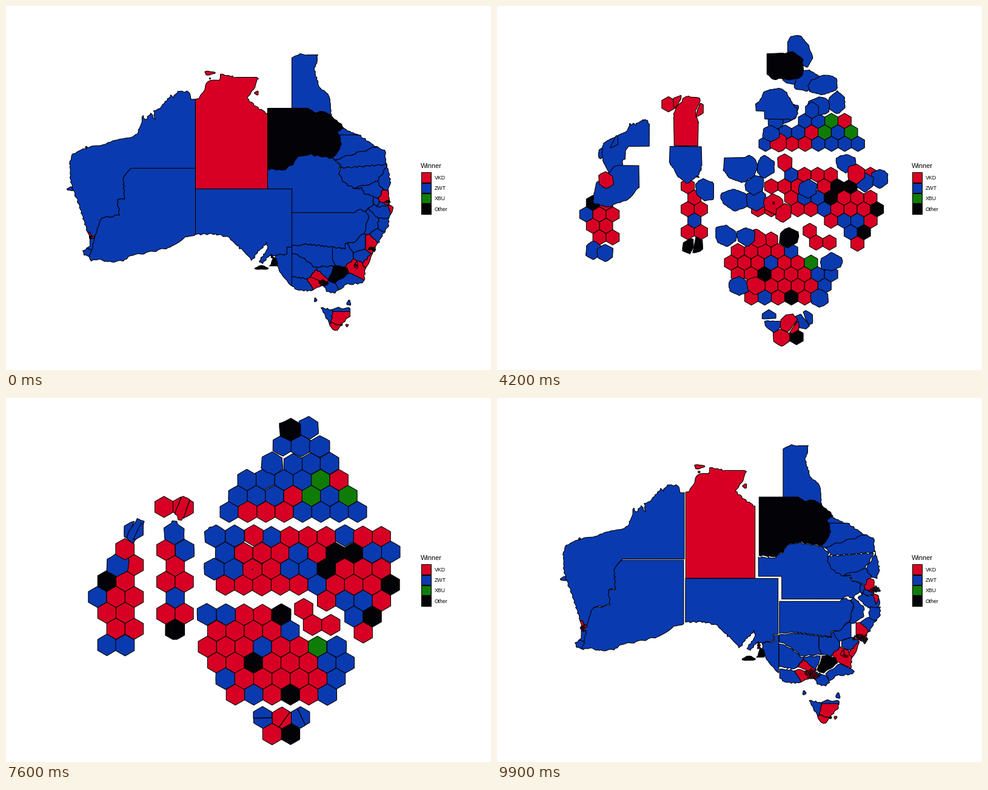
Recreate the animation shown at these times as a matplotlib script. Size 800x600 px, loop 10 s.

```python
import numpy as np
import matplotlib.pyplot as plt
from matplotlib.animation import FuncAnimation
from matplotlib.collections import PolyCollection
from matplotlib.patches import Rectangle

STEPS = 25
R = 18.15
DX, DY = 31.45, 27.3
COLOURS = {"R": "#d70024", "B": "#0a3ab0", "G": "#107c08", "K": "#020207"}
LABELS = {"R": "VKD", "B": "ZWT", "G": "XBU", "K": "Other"}

# hex rows per region: first y, rows of (first x, winners), city, city spread
REGIONS = {
    "WA": (216, [(214, "B"), (198, "R"), (182.5, "BR"), (167, "KR"), (151, "BRR"),
                 (167, "RR"), (182.5, "RR"), (167, "BB")], (139, 381), .04),
    "NT": (181.5, [(257, "RR")], (336, 119), .06),
    "SA": (216, [(272, "B"), (256, "RB"), (272, "R"), (256, "RR"), (272, "B"),
                 (256, "RR"), (272, "K")], (438, 412), .04),
    "QLD": (45, [(467, "KB"), (451, "BBB"), (435, "BBBB"), (388, "BBBBGR"),
                 (372, "BBBRGBG"), (357, "BRRRBBBB")], (629, 322), .04),
    "NSW": (221.5, [(336, "BBRBRRRBRR"), (351.5, "BRRRBRKKBB"), (336, "BBRRBBKRRR"),
                    (351.5, "RRRRRBRRRK"), (525, "RBBR"), (572, "BK"), (588, "R")],
            (604, 400), .04),
    "ACT": (344, [(487, "R"), (502, "RR")], (577, 427), .06),
    "VIC": (353, [(324, "BBRRK"), (340, "RRRRB"), (324, "RRRBRRGB"),
                  (340, "RRKRRRBB"), (356, "BRRRRRB"), (372, "RBRKRB")],
            (523, 456), .06),
    "TAS": (527.3, [(419, "BRB"), (434, "RK")], (553, 525), .08),
}


def ellipse(x, y, rx, ry, n=18, wobble=0):
    a = np.linspace(0, 2 * np.pi, n, endpoint=False) - np.pi / 2
    k = 1 + wobble * np.sin(3 * a + x)
    return np.column_stack([x + k * rx * np.cos(a), y + k * ry * np.sin(a)])


def islet(x, y, rx, ry):
    return ellipse(x, y, rx, ry, wobble=.25)


HEX = ellipse(0, 0, R, R, 6)
DOT = ellipse(0, 0, .6, .6, 6)


def clip(poly, normal, limit):
    """Keep the side of a polygon where p . normal <= limit."""
    out = []
    for p, q in zip(poly, np.roll(poly, -1, axis=0)):
        a, b = p @ normal - limit, q @ normal - limit
        if a <= 0:
            out.append(p)
        if a * b < 0:
            out.append(p + (q - p) * a / (a - b))
    return np.array(out)


def cells(outline, sites):
    """Divide an outline among sites, each point going to the nearest."""
    pts = np.array(sites, float)
    for a in pts:
        cell = np.array(outline, float)
        for b in pts:
            if (a != b).any():
                cell = clip(cell, b - a, (b @ b - a @ a) / 2)
        yield cell


def strips(angle, *breaks):
    """Cut the hexagon with parallel lines, in order along the angle."""
    n = np.array([np.cos(np.radians(angle)), np.sin(np.radians(angle))])
    edges = [-99, *breaks, 99]
    return [clip(clip(HEX, n, hi), -n, -lo) for lo, hi in zip(edges, edges[1:])]


def rough(points, step=3.2, amp=1.3):
    """Straight borders stay as they are, slanted ones get a ragged line."""
    out = []
    pts = np.array(points, float)
    for p, q in zip(pts, np.roll(pts, -1, axis=0)):
        out.append(p)
        if np.isclose(p, q).any():
            continue
        n = int(np.hypot(*(q - p)) // step)
        for j in range(1, n):
            x, y = p + (q - p) * j / n
            out.append((x + amp * np.sin(1.9 * x + 2.7 * y),
                        y + amp * np.sin(3.1 * x - 2.3 * y)))
    out = np.array(out)
    while len(out) < 18:
        mid = (out + np.roll(out, -1, axis=0)) / 2
        out = np.stack([out, mid], axis=1).reshape(-1, 2)
    return out


def clockwise(poly):
    x, y = poly.T
    area = np.sum(x * np.roll(y, -1) - y * np.roll(x, -1))
    return poly if area > 0 else poly[::-1]


def match(shape, goal):
    """Spread the points of shape over goal, turned to the nearest fit."""
    n = len(shape)
    ring = np.vstack([goal, goal[:1]])
    dist = np.r_[0, np.cumsum(np.hypot(*np.diff(ring, axis=0).T))]
    at = np.round(dist / dist[-1] * n)
    i = np.arange(n)
    even = np.column_stack([np.interp(i, at, ring[:, 0]), np.interp(i, at, ring[:, 1])])
    mid = shape - shape.mean(axis=0)
    fits = [np.sum(mid * np.roll(even, s, axis=0)) for s in range(n)]
    return np.roll(even, int(np.argmax(fits)), axis=0)


# borders shared by two outlines
west = [(206, 267), (193, 283), (195, 318), (183, 319), (187, 344), (158, 349), (146, 380)]
cape = [(471, 168), (498, 168), (508, 175), (525, 174), (536, 181)]
gulf = [(431, 268), (456, 270), (472, 262), (480, 249), (500, 244), (519, 248), (538, 250)]
coral = [(538, 250), (549, 236), (553, 227), (546, 206)]
downs = [(538, 250), (552, 262), (548, 276), (555, 289), (572, 300), (587, 299), (590, 309),
         (604, 312), (606, 326)]
tweed = [(606, 326), (613, 331), (632, 328)]
slopes = [(592, 338), (598, 348), (590, 375), (571, 390), (559, 391), (559, 400), (538, 397)]
plains = [(471, 395), (495, 392), (538, 397)]
bush = [(538, 397), (538, 418), (545, 428)]
murray = [(471, 407), (491, 415), (507, 430), (545, 428)]
alps = [(545, 428), (562, 431), (565, 440), (590, 452)]
southwest = [(146, 380), (142, 392), (141, 402), (137, 413)]

durack = west + [(134, 372), (119, 325), (106, 290), (105, 255), (110, 243), (133, 234),
                 (172, 224), (209, 215), (218, 207), (226, 180), (230, 187), (238, 176),
                 (246, 186), (243, 172), (254, 168), (271, 146), (276, 151), (283, 140),
                 (300, 141), (304, 152), (312, 153), (312, 267)]
o_coast = [(312, 267), (312, 376), (295, 380), (270, 397), (242, 404), (206, 411), (193, 420),
           (168, 421), (152, 417), (140, 420)]
top_end = [(312, 153), (318, 152), (333, 124), (351, 122), (353, 112), (380, 117), (407, 117),
           (416, 119), (408, 137), (397, 152), (412, 165), (431, 177), (431, 301), (312, 301)]
outback = [(312, 301), (471, 301), (471, 397), (463, 397), (463, 408), (443, 411), (434, 411),
           (423, 424), (417, 421), (427, 407), (431, 399), (429, 389), (418, 402), (404, 419),
           (393, 405), (378, 392), (368, 381), (345, 375), (312, 376)]
barker = [(471, 397), (471, 461), (458, 447), (447, 428), (443, 411), (463, 408), (463, 397)]
mayo = [(440, 413), (445, 416), (447, 428), (434, 428)]
york = cape + [(534, 155), (530, 144), (516, 133), (508, 105), (514, 80), (497, 80),
               (485, 78), (471, 85)]
kennedy = [(431, 168)] + cape + [(545, 188), (557, 201)] + coral[::-1] + gulf[-2::-1]
maranoa = gulf + downs[1:] + [(592, 338), (582, 335), (575, 340), (471, 340), (471, 301), (431, 301)]
parkes = [(471, 340), (575, 340), (582, 335)] + slopes + plains[-2::-1]
farrer = plains + bush[1:] + murray[-2::-1]
kangaroo = islet(421, 431, 10, 3)

# groups of neighbours: region, outline, {(row, column): site}
ZONES = [
    ("WA", southwest + [(128, 410), (126, 403), (138, 395), (138, 384), (134, 372)],
     {(1, 0): (140, 374), (7, 0): (140, 391), (7, 1): (134, 409)}),
    ("QLD", coral + [(557, 201), (581, 212), (605, 228), (624, 237), (626, 252), (634, 290),
                     (630, 300), (632, 328)] + tweed[-2::-1] + downs[-2:0:-1],
     {(1, 0): (590, 200), (1, 1): (590, 224), (1, 2): (598, 250), (3, 1): (600, 276),
      (2, 3): (630, 293), (2, 2): (609, 306), (2, 1): (638, 316), (5, 1): (625, 315),
      (3, 0): (604, 324), (4, 0): (618, 333)}),
    ("NSW", tweed + [(638, 331), (630, 352), (631, 362), (612, 391), (592, 433), (590, 452)]
     + alps[-2::-1] + bush[-2::-1] + slopes[-2::-1],
     {(2, 1): (556, 411), (1, 0): (584, 394), (1, 4): (589, 411), (2, 2): (577, 432),
      (3, 2): (600, 420), (0, 1): (602, 358), (0, 7): (622, 338), (0, 2): (640, 333),
      (1, 9): (624, 360), (1, 8): (617, 379), (0, 8): (601, 394)}),
    ("VIC", murray + alps[1:] + [(587, 456), (558, 459), (542, 473), (528, 470), (522, 459),
                                 (503, 469), (483, 468), (471, 461)],
     {(0, 0): (499, 432), (4, 0): (495, 466), (4, 1): (511, 458), (0, 2): (516, 446),
      (0, 1): (525, 436), (0, 4): (546, 443), (2, 7): (556, 457), (5, 5): (535, 468)}),
    ("TAS", [(519, 497), (537, 500), (545, 497), (567, 498), (567, 511), (553, 525),
             (546, 534), (538, 532), (527, 514)],
     {(0, 0): (523, 508), (0, 2): (552, 494), (0, 1): (552, 512), (1, 0): (545, 538)}),
]

# large seats in drawing order: (region, row, column) -> parts
large = {
    ("WA", 0, 0): [islet(106, 301, 5, 3), durack, islet(132, 232, 1.5, 1)],
    ("WA", 2, 0): [west[::-1] + o_coast + southwest[:0:-1]],
    ("NT", 0, 1): [islet(335, 110, 8, 3), top_end, islet(413, 143, 3, 3)],
    ("SA", 0, 0): [outback],
    ("SA", 1, 1): [barker],
    ("SA", 6, 0): [kangaroo, mayo],
    ("QLD", 0, 1): [york],
    ("NSW", 0, 0): [parkes],
    ("NSW", 2, 0): [farrer],
}
for region, outline, sites in ZONES:
    for (row, col), cell in zip(sites, cells(outline, list(sites.values()))):
        large[region, row, col] = [cell]
large["QLD", 0, 0] = [kennedy]
large["QLD", 2, 0] = [maranoa]
large["NSW", 2, 2].append(islet(577, 427, 3, 5))
large["TAS", 0, 0].insert(0, islet(510, 484, 2, 3))
large["TAS", 0, 1].append(islet(562, 526, 2, 2))
large["TAS", 0, 2].append(islet(565, 489, 3, 4))

# how the hexagons of seats with islands are divided
CUTS = {
    ("WA", 0, 0): strips(25, -6, 6),
    ("NT", 0, 1): strips(20, -8, 5),
    ("SA", 6, 0): strips(10, 0),
    ("NSW", 2, 2): [HEX, DOT],
    ("TAS", 0, 0): strips(88, 1),
    ("TAS", 0, 1): strips(36, 5),
    ("TAS", 0, 2): strips(-25, 2),
}

homes, whole, cities, country = {}, [], [], []


def add_region(name, y0, rows, city, spread):
    seats = [((name, r, c), np.array([x + c * DX, y0 + r * DY]), COLOURS[win])
             for r, (x, wins) in enumerate(rows) for c, win in enumerate(wins)]
    mid = np.mean([pos for key, pos, _ in seats if key not in large], axis=0)
    for key, pos, colour in seats:
        homes[key] = pos, colour
        whole.append((colour, HEX + pos))
        if key not in large:
            start = np.array(city) + spread * (pos - mid)
            cities.append((colour, start + HEX * spread, HEX + pos))


for name, spec in REGIONS.items():
    add_region(name, *spec)
for key, parts in large.items():
    pos, colour = homes[key]
    for part, goal in zip(parts, CUTS.get(key, [HEX])):
        shape = clockwise(rough(part))
        country.append((colour, shape, match(shape, clockwise(goal)) + pos))

fig = plt.figure(figsize=(8, 6), dpi=100, facecolor="white")
ax = fig.add_axes([0, 0, 1, 1])
ax.set_xlim(-.5, 799.5)
ax.set_ylim(599.5, -.5)
ax.axis("off")

LINE = 1.1 * .72
seats = PolyCollection([], edgecolors="black", linewidths=LINE, joinstyle="round")
ax.add_collection(seats, autolim=False)

sans = dict(family="Liberation Sans", color="black", va="baseline")
ax.text(683, 266.5, "Winner", size=11 * .72, **sans)
for i, (key, label) in enumerate(LABELS.items()):
    y = 282 + 17.28 * i
    ax.add_patch(Rectangle((684, y - 8.2), 16.4, 16.4, fc=COLOURS[key], ec="black", lw=LINE))
    ax.text(706, y + 3.2, label, size=8.8 * .72, **sans)


def draw(i):
    k = min(max(min(i - 25, 100 - i), 0), STEPS)
    if k == STEPS:
        colours, verts = zip(*whole)
    else:
        # city seats sit on top until they have grown
        order = country + cities if k < 4 else cities + country
        colours = [c for c, _, _ in order]
        verts = [a + (b - a) * k / STEPS for _, a, b in order]
    seats.set_verts(verts)
    seats.set_facecolor(colours)
    return [seats]


anim = FuncAnimation(fig, draw, frames=100, interval=100, init_func=lambda: draw(0),
                     repeat=True, repeat_delay=0)
plt.show()
```
